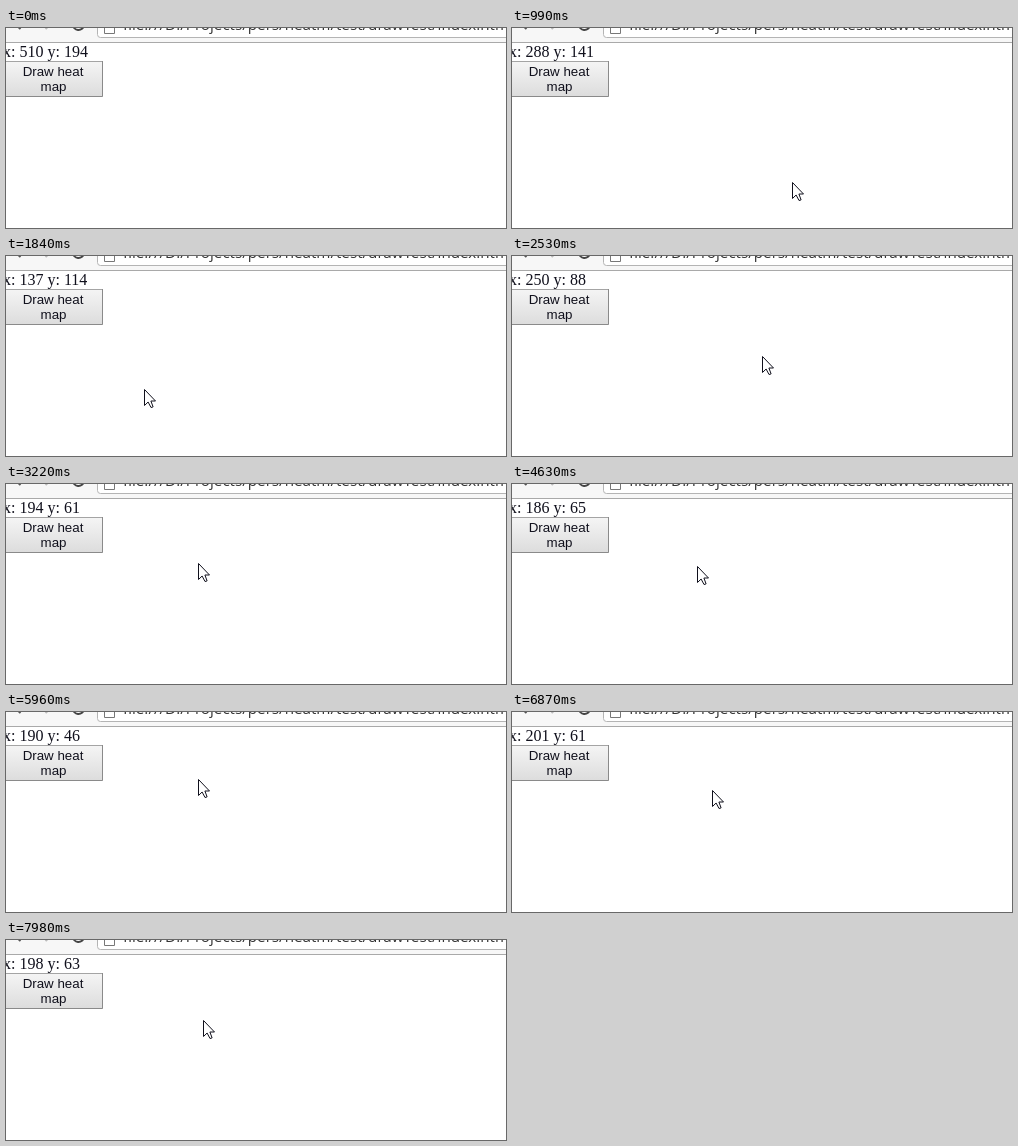
An HTML page with a canvas that plays this animation: 500x200 px, repeating every 8000 ms.

```html
<!DOCTYPE html>
<html lang="en">
<head>
<meta charset="utf-8">
<title>Pointer tracker</title>
<style>
html, body { margin: 0; width: 100%; height: 100%; overflow: hidden; background: #fff; }
canvas { display: block; }
</style>
</head>
<body>
<canvas id="stage" width="500" height="200"></canvas>
<script>
const ctx = document.getElementById('stage').getContext('2d');
const LOOP = 8000;
const START = 345;  // ms before the pointer first moves
const STEP = 77.65; // ms between pointer updates
const LAG = 0.5;    // steps by which the readout trails the pointer
const INK = '#10101c';

// Turning points of the pointer tip: [step, x, y]
const path = [
  [0, 509, 211], [4, 360, 186], [11, 248, 140], [15, 150, 102],
  [20, 138, 133], [25, 190, 142], [29, 250, 100], [34, 212, 60],
  [38, 192, 79], [42, 196, 76], [50, 196, 60], [56, 185, 82],
  [62, 206, 64], [71, 172, 49], [73, 192, 67], [75, 196, 81],
  [80, 180, 62], [85, 200, 78], [90, 186, 64], [99, 197, 80]
];

// Velocity at a turning point, from its two neighbours; at rest at both ends.
function slope(i, axis) {
  const a = path[i - 1], b = path[i + 1];
  return a && b ? (b[axis] - a[axis]) / (b[0] - a[0]) : 0;
}

// Position and velocity on a smooth curve through the turning points.
function motion(step, axis) {
  let i = 0;
  while (i < path.length - 2 && step >= path[i + 1][0]) i++;
  const a = path[i], b = path[i + 1];
  const h = b[0] - a[0];
  const u = Math.min(1, (step - a[0]) / h);
  const d = b[axis] - a[axis];
  const m = slope(i, axis) * h, n = slope(i + 1, axis) * h;
  const c2 = 3 * d - 2 * m - n, c3 = m + n - 2 * d;
  return {
    pos: a[axis] + u * (m + u * (c2 + u * c3)),
    vel: (m + u * (2 * c2 + u * 3 * c3)) / h
  };
}

function text(str, x, y, font, color, align = 'left') {
  ctx.font = font;
  ctx.fillStyle = color;
  ctx.textAlign = align;
  ctx.fillText(str, x, y);
}

function trace(points) {
  ctx.beginPath();
  points.forEach(([x, y]) => ctx.lineTo(x, y));
}

function stroke(color, width = 1) {
  ctx.strokeStyle = color;
  ctx.lineWidth = width;
  ctx.stroke();
}

function line(points, color, width) {
  trace(points);
  stroke(color, width);
}

function drawToolbar() {
  ctx.fillStyle = '#f7f7f7';
  ctx.fillRect(0, 0, 500, 14);
  ctx.fillStyle = '#a9a9a9';
  ctx.fillRect(0, 14, 500, 1);

  ctx.beginPath();
  ctx.roundRect(91.5, -20.5, 430, 30, 3);
  ctx.fillStyle = '#fff';
  ctx.fill();
  stroke('#b4b4b4');

  line([[8, -5], [14.5, 1]], '#555', 2);
  line([[46, -5], [39.5, 1]], '#bbb', 2);
  ctx.beginPath();
  ctx.arc(72.5, -3.5, 5.5, 0.1, Math.PI);
  stroke('#444', 2);

  line([[98.5, -4], [98.5, 5.5], [108.5, 5.5], [108.5, -4]], '#777');
  text('file:///D:/Projects/pers/heatm/test/drawTest/index.html',
    117, 2, '15.2px "Open Sans", "Noto Sans", sans-serif', '#333');
}

function drawButton() {
  const shade = ctx.createLinearGradient(0, 33, 0, 69);
  shade.addColorStop(0, '#f5f5f5');
  shade.addColorStop(1, '#dcdcdc');
  ctx.fillStyle = shade;
  ctx.fillRect(-3, 33, 100, 36);
  line([[-3, 33.5], [96.5, 33.5]], '#a4a4a4', 1);
  line([[96.5, 33], [96.5, 68.5], [-3, 68.5]], '#8a8a8a', 1);

  const font = '13.333px "Liberation Sans", Arial, sans-serif';
  text('Draw heat', 47, 48, font, INK, 'center');
  text('map', 47.5, 63, font, INK, 'center');
}

function drawPointer(x, y) {
  ctx.save();
  ctx.translate(Math.round(x) + 0.5, Math.round(y) + 0.5);
  trace([[0, 0], [0, 16], [3.6, 12.5], [6.5, 18], [8.6, 17.4], [6.4, 11.5], [11, 11.5]]);
  ctx.closePath();
  ctx.fillStyle = '#fff';
  ctx.fill();
  stroke(INK);
  ctx.restore();
}

function draw(ms) {
  const step = Math.max(0, Math.floor((ms - START) / STEP) + 1);
  const x = motion(step, 1), y = motion(step, 2);
  const readout = p => Math.round(p.pos - LAG * p.vel);

  ctx.fillStyle = '#fff';
  ctx.fillRect(0, 0, 500, 200);
  drawToolbar();
  text(`x: ${readout(x) + 1} y: ${readout(y) - 17}`, -3, 29,
    '16px "Liberation Serif", "Times New Roman", serif', INK);
  drawButton();
  drawPointer(x.pos, y.pos);
}

function tick() {
  draw(performance.now() % LOOP);
  requestAnimationFrame(tick);
}
tick();
</script>
</body>
</html>
```
